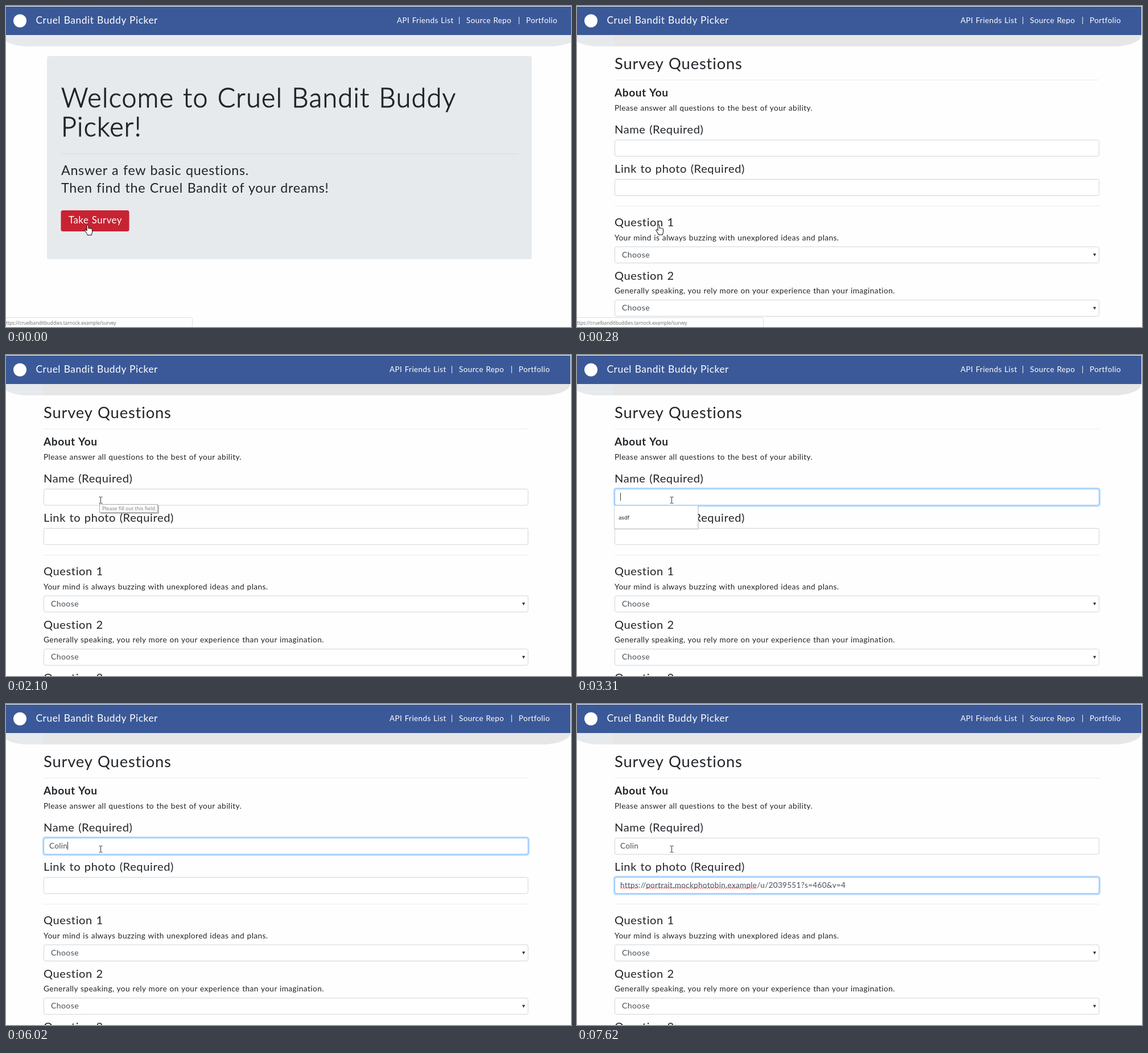
Animation of 993x564 px, one loop 8000 ms. Source, as an HTML page:

```html
<!DOCTYPE html>
<html lang="en">
<head>
<meta charset="utf-8">
<title>Survey</title>
<style>
  html, body { margin: 0; width: 100%; height: 100%; overflow: hidden; background: #fefefe; }
  svg { display: block; width: 993px; height: 564px; }
  text { font-family: Lato, "Open Sans", sans-serif; letter-spacing: .03em; word-spacing: .04em; fill: #212529; }
  .nav text { fill: #fff; font-size: 13.5px; }
  .nav .brand { font-size: 17.4px; }
  .nav .bar { text-anchor: middle; }
  .display { font-size: 46.5px; font-weight: 300; stroke: #212529; stroke-width: 1.1; }
  .lead { font-size: 23.3px; }
  .title { font-size: 27.4px; }
  .bold { font-size: 19.1px; font-weight: 700; }
  .label { font-size: 20.1px; }
  .body { font-size: 13.7px; }
  .value { font-size: 13.6px; letter-spacing: .02em; fill: #495057; }
  .choice { font-size: 14px; fill: #495057; }
  .ui { font-family: "Open Sans", "Noto Sans", sans-serif; letter-spacing: 0; word-spacing: 0; }
  .field { fill: #fff; stroke: #ced4da; }
  .rule { fill: #000; fill-opacity: .07; }
  .ring { fill: none; stroke: #bfdeff; stroke-width: 2.4; }
  .edge { fill: none; stroke: #80bdff; }
  .wave { fill: none; stroke: #e8383d; stroke-width: 1; }
</style>
</head>
<body>
<svg viewBox="0 0 993 564">
  <rect width="993" height="564" fill="#fefefe"/>
  <path id="band"/>
  <path id="bandLeft" d="M0 51H65V71H41.5A50 20 0 0 1 0 62.2z" fill="#e7eaed"/>
  <g class="nav">
    <rect id="bar" y="1" height="50" fill="#3b5998"/>
    <circle cx="24.5" cy="26" r="11.5" fill="#fff"/>
    <text class="brand" x="52.5" y="31">Cruel Bandit Buddy Picker</text>
    <g id="links">
      <text x="687" y="30">API Friends List</text>
      <text class="bar" x="797" y="30">|</text>
      <text x="809" y="30">Source Repo</text>
      <text class="bar" x="902" y="30">|</text>
      <text x="914" y="30">Portfolio</text>
    </g>
  </g>

  <g id="home">
    <rect x="72" y="88" width="852" height="357" rx="4" fill="#e7eaed"/>
    <text class="display" x="97" y="178">Welcome to Cruel Bandit Buddy</text>
    <text class="display" x="97" y="229">Picker!</text>
    <rect class="rule" x="97" y="259" width="804" height="1"/>
    <text class="lead" x="97" y="297">Answer a few basic questions.</text>
    <text class="lead" x="97" y="328">Then find the Cruel Bandit of your dreams!</text>
    <rect id="press" x="94.5" y="357" width="124" height="41" rx="5" fill="#e995a0"/>
    <rect x="96.5" y="359" width="120" height="37" rx="3.5" fill="#c82333"/>
    <text x="110" y="382" style="font-size:16.8px;fill:#fff">Take Survey</text>
  </g>

  <g id="survey">
    <text class="title" x="66" y="111">Survey Questions</text>
    <rect class="rule" x="66" y="129.5" width="852" height="1"/>
    <text class="bold" x="66" y="159">About You</text>
    <text class="body" x="66" y="183.5">Please answer all questions to the best of your ability.</text>
    <text class="label" x="66" y="223.5">Name (Required)</text>
    <text class="label" x="66" y="292.5">Link to photo (Required)</text>
    <rect class="rule" x="66" y="351" width="852" height="1"/>
    <g id="questions"></g>
    <g id="fields"></g>
    <text id="name" class="value" x="76" y="253.5"></text>
    <text id="link" class="value" x="76" y="322.5"></text>
    <path id="waves" class="wave"/>
    <g id="list">
      <rect x="66" y="265" width="148" height="42" rx="1" fill="#000" fill-opacity=".12"/>
      <rect x="65.5" y="264.5" width="147" height="40.5" fill="#fff" stroke="#d0d0d0"/>
      <text class="ui" x="73" y="288.5" style="font-size:9.6px;fill:#111">asdf</text>
    </g>
    <rect id="caret" width="1" height="14" fill="#333"/>
    <g id="tip">
      <rect x="166" y="264" width="103" height="15" fill="#000" fill-opacity=".25"/>
      <rect x="164.5" y="262.5" width="102" height="14" fill="#fff" stroke="#a8a8a8"/>
      <text class="ui" x="169" y="272.5" style="font-size:8.5px;font-weight:600;fill:#999">Please fill out this field.</text>
    </g>
  </g>

  <g id="status">
    <path id="bubble" d="M-2 547.5H325a2.5 2.5 0 0 1 2.5 2.5V566H-2z" fill="#fefefe" stroke="#dcdee0"/>
    <text id="address" class="ui" x="-5" y="559.5" style="font-size:8.3px;fill:#686c70">https://cruelbanditbuddies.tarnock.example/survey</text>
  </g>

  <g id="cursor" fill="#fff" stroke="#000" stroke-width="1" stroke-linejoin="round">
    <path id="hand" d="M-1.4 10V1.2a1.4 1.4 0 0 1 2.8 0V6c.4-1 2.3-.8 2.5.3c.5-.9 2.1-.6 2.3.5c.5-.8 1.9-.4 1.9.9V12c0 2-1.2 3-1.2 5.5H-.3C-.6 15-4 12-4.6 9.6c-.4-1.4 1.4-1.9 2.1-.9z"/>
    <path id="arrow" stroke="#222" stroke-width=".8" d="M0 0V12.5L2.9 9.8L4.8 14L6.8 13.1L5 9.1H8.8Z"/>
    <path id="beam" fill="none" stroke="#333" d="M-3-5.5H-.8L0-5L.8-5.5H3M0-5V5M-3 5.5H-.8L0 5L.8 5.5H3"/>
  </g>
</svg>
<script>
const LOOP = 8000;
const LINK = "https://portrait.mockphotobin.example/u/2039551?s=460&v=4";
const HOST = [8, 29]; // start and length of the host part

const $ = id => document.getElementById(id);
const set = (el, attrs) => { for (const k in attrs) el.setAttribute(k, attrs[k]); };
const show = (id, on) => $(id).setAttribute("visibility", on ? "inherit" : "hidden");
const during = (t, from, to) => t >= from && t < to;

// Value of the last [time, value] step already reached
const step = (t, steps) => steps.reduce((v, s) => t >= s[0] ? s[1] : v, steps[0][1]);

// Question blocks repeat at a fixed pitch
const hints = [
  "Your mind is always buzzing with unexplored ideas and plans.",
  "Generally speaking, you rely more on your experience than your imagination.",
  ""
];
$("questions").innerHTML = hints.map((hint, i) => `
  <g transform="translate(0 ${i * 93.7})">
    <text class="label" x="66" y="387">Question ${i + 1}</text>
    <text class="body" x="66" y="411.5">${hint}</text>
    <rect class="field" x="66.5" y="423" width="851" height="28.5" rx="3"/>
    <text class="choice" x="79" y="441.5">Choose</text>
    <path d="M907 435h5.4l-2.7 5z" fill="#343a40"/>
  </g>`).join("");

$("fields").innerHTML = [235.5, 304.5].map((y, i) => `
  <rect class="field" x="66.5" y="${y}" width="851" height="28.5" rx="3"/>
  <g id="focus${i}">
    <rect class="ring" x="65" y="${y - 1.5}" width="854" height="31.5" rx="4"/>
    <rect class="edge" x="66.5" y="${y}" width="851" height="28.5" rx="3"/>
  </g>`).join("");

const typing = [[0, ""], [3700, "C"], [3840, "Cok"], [4400, "Co"], [4520, "Coi"], [4790, "Col"], [4940, "Colin"]];
const pointer = [
  [0, ["hand", 143.5, 385]], [120, ["arrow", 143.5, 384.5]], [280, ["hand", 143.5, 384.5]],
  [1100, ["beam", 141.5, 395]], [1260, ["beam", 170.5, 291.5]],
  [1400, ["arrow", 168, 268]], [1550, ["beam", 166.5, 255]]
];
const glow = [
  [[0, 0], [2230, .5], [2360, 1], [6140, .4], [6290, 0]],
  [[0, 0], [6140, .5], [6290, 1]]
];
const caretOn = [[0, 0], [2230, 1], [2750, 0], [3310, 1], [5480, 0], [6020, 1], [6690, 0], [7100, 1], [7620, 0]];

function zigzag(from, to) {
  let d = `M${from} 324`;
  for (let x = from + 2, up = true; x <= to; x += 2, up = !up) d += `L${x} ${up ? 322.3 : 324.3}`;
  return d;
}

// The survey page is narrower by the width of its scrollbar
function drawHeader(home) {
  const right = home ? 1004.5 : 992;
  set($("band"), {
    d: `M-8.5 51H${right}a50 20 0 0 1-50 20H41.5a50 20 0 0 1-50-20z`,
    fill: home ? "#e7eaed" : "#e6e6e6"
  });
  set($("bar"), { width: home ? 993 : 992 });
  set($("links"), { transform: `translate(${home ? 0 : -13} 0)` });
}

function draw(t) {
  const home = t < 280;
  drawHeader(home);
  show("home", home);
  show("survey", !home);
  show("press", during(t, 120, 280));

  show("status", t < 700);
  show("bubble", t < 560);
  set($("address"), { opacity: t < 560 ? 1 : .2 });

  const [shape, x, y] = step(t, pointer);
  for (const id of ["hand", "arrow", "beam"]) show(id, id === shape);
  set($("cursor"), { transform: `translate(${x} ${y})` });

  glow.forEach((g, i) => set($("focus" + i), { opacity: step(t, g) }));
  show("tip", during(t, 2100, 2230));
  show("list", during(t, 2490, 3700));

  const name = $("name"), link = $("link");
  name.textContent = step(t, typing);
  link.textContent = t < 7100 ? "" : LINK;

  const second = t >= 6140;
  const active = second ? link : name;
  const end = active.textContent ? active.getComputedTextLength() : 0;
  set($("caret"), { x: Math.round(76 + end), y: second ? 311 : 242 });
  show("caret", !home && step(t, caretOn));

  if (t >= 7620) {
    const at = n => 76 + link.getSubStringLength(0, n);
    set($("waves"), { d: zigzag(76, at(5)) + zigzag(at(HOST[0]), at(HOST[0] + HOST[1])) });
  }
  show("waves", t >= 7620);
}

const start = performance.now();
function tick() {
  draw((performance.now() - start) % LOOP);
  requestAnimationFrame(tick);
}
tick();
</script>
</body>
</html>
```
